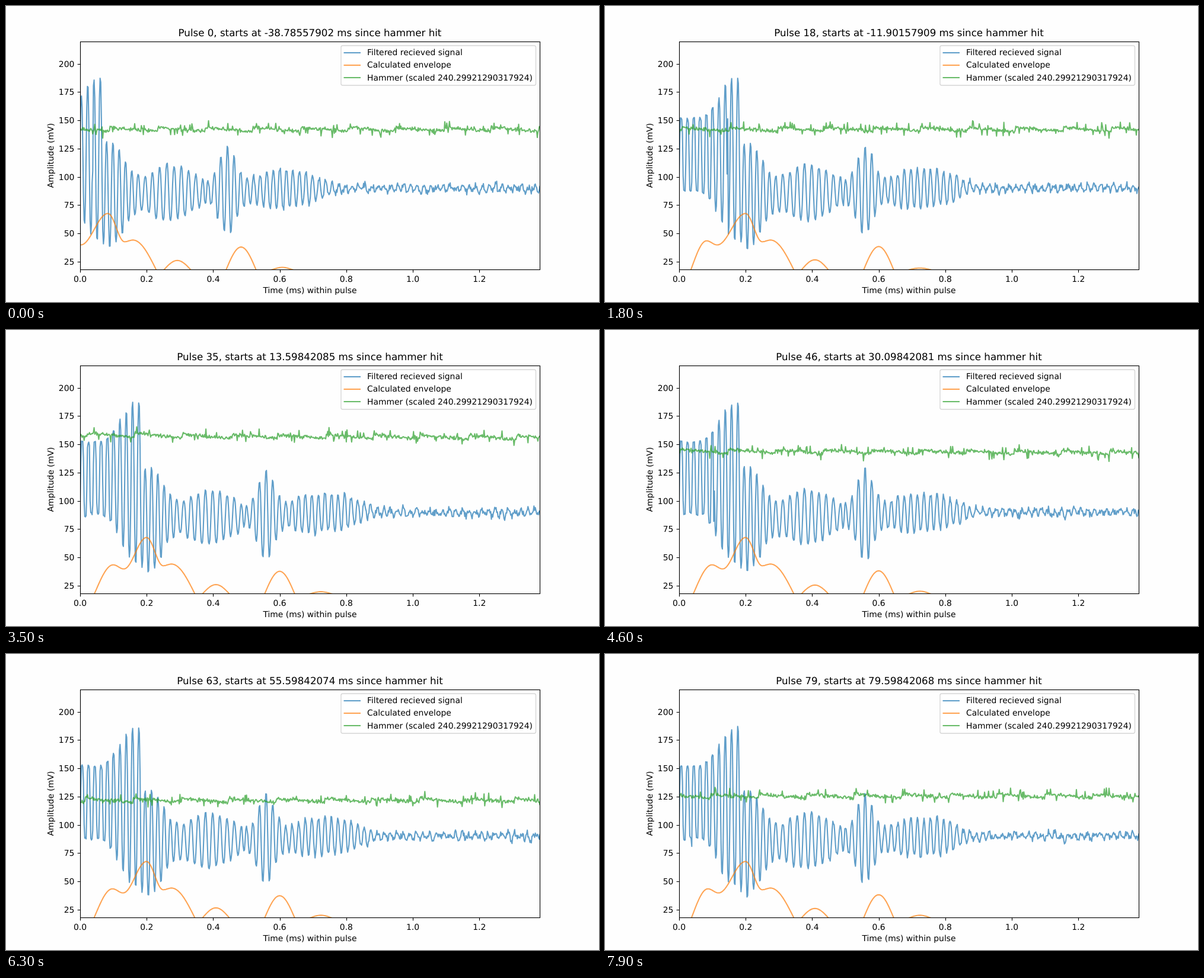
Write an HTML page that moves like this. It is 1000 px wide and 500 px high and loops after 8 s.

```html
<!DOCTYPE html>
<html lang="en">
<head>
<meta charset="utf-8">
<title>Pulse plot</title>
<style>
  html, body { margin: 0; width: 100%; height: 100%; overflow: hidden; background: #fefefe; }
  svg { display: block; width: 100vw; height: 100vh; }
  text { font-family: "DejaVu Sans", sans-serif; font-size: 13.89px; fill: #000; text-rendering: geometricPrecision; }
  .title { font-size: 16.67px; }
  .mid { text-anchor: middle; }
  .end { text-anchor: end; }
  .line { fill: none; stroke-width: 2.08; stroke-opacity: .7; stroke-linejoin: round; }
  .axis { fill: none; stroke: #000; stroke-width: 1.11; }
</style>
</head>
<body>
<svg viewBox="0 0 1000 500">
  <clipPath id="area"><rect x="125" y="60" width="775" height="385"/></clipPath>
  <g clip-path="url(#area)">
    <path id="signal" class="line" stroke="#1f77b4"/>
    <path id="envelope" class="line" stroke="#ff7f0e"/>
    <path id="hammer" class="line" stroke="#2ca02c"/>
  </g>
  <g id="axes"><rect class="axis" x="125.5" y="60.5" width="775" height="385"/></g>
  <text class="mid" x="512.5" y="485">Time (ms) within pulse</text>
  <text class="mid" transform="translate(80 252.5) rotate(-90)">Amplitude (mV)</text>
  <text id="title" class="mid title" x="512.5" y="51"></text>
  <g id="legend">
    <rect x="565" y="67" width="328.5" height="67" rx="2.8" fill="#fff" fill-opacity=".8" stroke="#ccc" stroke-opacity=".8" stroke-width="1.39"/>
  </g>
</svg>
<script>
const $ = id => document.getElementById(id);
const LEFT = 125, PX_MS = 561.1, STEP = 1.1222, SAMPLES = 692;
const FRAME = 100, PULSES = 80, LATE = 0.116;
const yOf = v => 479.3 - 1.908 * v;
const snap = v => Math.floor(v + .5) + .5;
const mix = (a, b, u) => a + (b - a) * u;
const clamp = u => Math.min(1, Math.max(0, u));
const ease = u => (1 - Math.cos(Math.PI * clamp(u))) / 2;
const bell = (x, [centre, height, width]) => height * Math.exp(-(((x - centre) / width) ** 2));

function add(parent, tag, attrs, text) {
  const el = document.createElementNS(parent.namespaceURI, tag);
  for (const k in attrs) el.setAttribute(k, attrs[k]);
  if (text) el.textContent = text;
  parent.appendChild(el);
}

function random(seed) {
  let s = Math.imul(seed + 1, 0x9E3779B1);
  return () => {
    s = s + 0x6D2B79F5 | 0;
    let r = Math.imul(s ^ s >>> 15, s | 1);
    r ^= r + Math.imul(r ^ r >>> 7, r | 61);
    return ((r ^ r >>> 14) >>> 0) / 4294967296;
  };
}

// Value between key points, with a curve for each segment
function between(pts, x, curve = clamp) {
  let i = 0;
  while (i < pts.length - 2 && pts[i + 1][0] <= x) i++;
  const [a, b] = [pts[i], pts[i + 1]];
  return mix(a[1], b[1], curve((x - a[0]) / (b[0] - a[0])));
}
const toPath = pts => "M" + pts.map(([x, v]) => x.toFixed(2) + " " + yOf(v).toFixed(2)).join("L");

// Ring-down and echoes after the drive stops: centre, height, width
const ECHOES = [[240, 44, 35], [337, 22, 45], [384, 6, 25], [438, 35, 20], [515, 14, 50], [575, 8, 35]];
const DRIVE_END = 228;

const period = x => x < 285 ? 10.62 : x < 390 ? 12.15 : x < 400 ? 8.4 : 11.03;

// Extreme of the oscillation at x; side is 1 for crests, -1 for troughs
function extreme(x, side) {
  const grow = ease((x - 160) / 59);
  if (x < DRIVE_END) return 120 - 4 * grow + side * (32 + 38 * grow);
  const amp = ECHOES.reduce((sum, e) => sum + bell(x, e), 2.5);
  return 84 + 6 * clamp((x - DRIVE_END) / 350) + side * amp;
}

// Hammer level against time since the hit
const HAMMER = [[0, 142], [.09, 187], [.3, 194.5], [.6, 195.5], [.9, 206], [3, 212],
  [8, 180], [14, 157], [30, 144], [56, 121.5], [80, 125.5]];
const hammerAt = t => between(HAMMER, t);

const startOf = n => .098420882 + (n - 26) * (1.5 - .377e-8) + (n ? 0 : LATE);

function signalPath(n, shift) {
  const rnd = random(n), noise = a => (rnd() + rnd() + rnd() - 1.5) * a;
  const knots = [[123, 90]];
  for (let x = 128.5; x < 980; x += period(x)) {
    const low = x + period(x) / 2;
    knots.push([x, extreme(x, 1) + noise(1.5)], [low, extreme(low, -1) + noise(1.5)]);
  }
  const sag = n < 26 ? 0 : 7 * Math.exp((26 - n) / 2.5);
  const pts = [];
  for (let i = 0; i < SAMPLES; i++) {
    const x = LEFT + i * STEP, fx = x + shift, sharp = fx < 180 ? 1.9 : 1.15;
    const v = between(knots, fx, u => ease((u - .5) * sharp + .5));
    pts.push([x, v - sag * clamp((fx - 125) / 250) + noise(1 + 2 * clamp((fx - 300) / 350))]);
  }
  // Most pulses carry one stray sample in the driven part
  if (rnd() < .7) pts[Math.floor(10 + rnd() * 75)][1] = 70 + rnd() * 90;
  return toPath(pts);
}

function envelopePath(n, shift) {
  const rnd = random(n + 900), hump = 170 + rnd() * 12;
  const body = [[124, 0], [hump, 43.3], [hump + 18, 39.7], [237, 67.5], [265, 42.5], [279, 44], [359, -10]];
  const main = [];
  for (let x = 124; x < 359; x++) main.push([x - shift, between(body, x, ease)]);
  const lobe = (centre, height, width) => {
    const pts = [];
    for (let u = -1.2; u < 1.21; u += .1)
      pts.push([centre + u * width - shift, 18 + height * Math.cos(u * Math.PI / 2)]);
    return toPath(pts);
  };
  return toPath(main) + lobe(354, 7 + rnd() * 2, 22) + lobe(461.5, 19 + rnd() * 2, 25) + lobe(531, 1 + rnd(), 16);
}

function hammerPath(n, start) {
  const rnd = random(n + 500), pts = [];
  for (let i = 0; i < SAMPLES; i++) {
    const t = start + i * STEP / PX_MS;
    const cycle = (t - .289) / .14333, u = cycle - Math.floor(cycle);
    const ripple = 1.7 - 3.4 * u;
    const spike = rnd() < .1 ? (rnd() < .55 ? 1 : -1) * (2 + rnd() * 4) : 0;
    pts.push([LEFT + i * STEP, hammerAt(t) + ripple + (rnd() + rnd() - 1) * 2 + spike]);
  }
  return toPath(pts);
}

function draw(n) {
  const start = startOf(n), shift = n ? 0 : LATE * PX_MS;
  $("title").textContent = `Pulse ${n}, starts at ${start.toFixed(8)} ms since hammer hit`;
  $("signal").setAttribute("d", signalPath(n, shift));
  $("envelope").setAttribute("d", envelopePath(n, shift));
  $("hammer").setAttribute("d", hammerPath(n, start));
  // The legend keeps clear of the hammer trace
  const drop = hammerAt(start + 1.1) > 181 ? 304.6 : 0;
  $("legend").setAttribute("transform", `translate(0 ${drop})`);
}

const axes = $("axes"), legend = $("legend");
for (let i = 0; i < 7; i++) {
  const x = LEFT + i * .2 * PX_MS;
  add(axes, "path", { class: "axis", d: `M${snap(x)} 445.5v4.86` });
  add(axes, "text", { class: "mid", x, y: 466 }, (i * .2).toFixed(1));
}
for (let v = 25; v <= 200; v += 25) {
  add(axes, "path", { class: "axis", d: `M125.5 ${snap(yOf(v))}h-4.86` });
  add(axes, "text", { class: "end", x: 115.3, y: Math.floor(yOf(v) + 5.5) }, String(v));
}
[["#1f77b4", "Filtered recieved signal"], ["#ff7f0e", "Calculated envelope"],
  ["#2ca02c", "Hammer (scaled 240.29921290317924)"]].forEach(([stroke, label], i) => {
  const y = 78.6 + i * 21.1;
  add(legend, "path", { class: "line", stroke, d: `M569.5 ${Math.round(y)}h28.5` });
  add(legend, "text", { x: 609, y: y + 4.7 }, label);
});

let shown = -1;
function tick() {
  const n = Math.floor(performance.now() / FRAME) % PULSES;
  if (n !== shown) draw(shown = n);
  requestAnimationFrame(tick);
}
tick();
</script>
</body>
</html>
```
